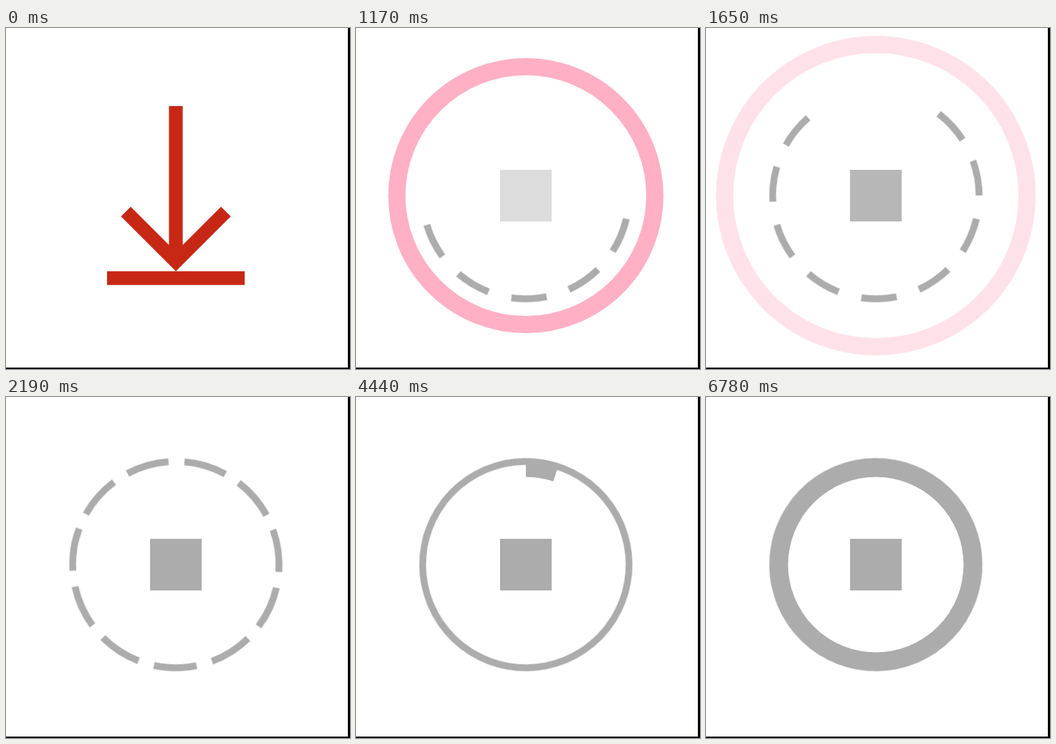
Recreate the animation shown at these times as an HTML page without scripts. Size 480x476 px, loop 8000 ms.

```html
<!DOCTYPE html>
<html lang="en">
<head>
<meta charset="utf-8">
<title>Download progress</title>
<style>
  html, body { margin: 0; width: 100%; height: 100%; overflow: hidden; background: #fff; }
  svg { display: block; width: 100%; height: 100%; }
  svg * { animation: 8s linear infinite; }

  .arrow { fill: none; stroke: #c72815; stroke-width: 19.2; animation-name: arrow; animation-timing-function: step-end; }
  .square { fill: #acacac; animation-name: square; }
  .track, .cover, .ripple, .progress { fill: none; }
  .track { stroke: #acacac; stroke-width: 9.6; animation-name: track, close-gaps; }
  .cover { stroke: #fff; stroke-width: 13; animation-name: uncover; }
  .ripple { stroke: #ff4070; stroke-width: 24; animation-name: ripple; }
  .progress { stroke: #acacac; stroke-width: 24; animation-name: progress; }

  @keyframes arrow {
    0% { opacity: 1; }
    10.5%, 100% { opacity: 0; }
  }
  @keyframes square {
    0% { opacity: 0; animation-timing-function: step-end; }
    10.5% { opacity: .12; }
    22.5%, 100% { opacity: 1; }
  }
  @keyframes track {
    0% { opacity: 0; animation-timing-function: step-end; }
    10.5%, 100% { opacity: 1; }
  }
  /* The path is 11 units long: one per dash. */
  @keyframes close-gaps {
    0%, 25.875% { stroke-dasharray: .6 .4; animation-timing-function: cubic-bezier(.22, .8, .38, 1); }
    41.62% { stroke-dasharray: 1 0; animation-timing-function: step-end; }
    41.625%, 100% { stroke-dasharray: 11 0; }
  }
  /* Dashes appear in pairs, from the bottom up. */
  @keyframes uncover {
    0%, 10.1875% { stroke-dasharray: 10 11; stroke-dashoffset: 0; animation-timing-function: steps(5, end); }
    20.9375%, 100% { stroke-dasharray: 0 11; stroke-dashoffset: -5; }
  }
  @keyframes ripple {
    0% { r: 140.9px; opacity: 0; animation-timing-function: step-end; }
    10.5% { r: 140.9px; opacity: .595; }
    22.499% { r: 214.4px; opacity: .063; animation-timing-function: step-end; }
    22.5%, 100% { r: 214.4px; opacity: 0; }
  }
  /* Radius slows down while the fade stays even. */
  @keyframes grow {
    0%, 10.5% { r: 140.9px; animation-timing-function: cubic-bezier(.333, .609, .667, .943); }
    22.5%, 100% { r: 214.4px; }
  }
  .ripple { animation-name: ripple, grow; }
  @keyframes progress {
    0% { opacity: 0; stroke-dasharray: .05 1; animation-timing-function: step-end; }
    55.5% { opacity: 1; stroke-dasharray: .05 1; animation-timing-function: cubic-bezier(.333, .523, .667, .973); }
    84.75%, 100% { opacity: 1; stroke-dasharray: 1 1; }
  }
</style>
</head>
<body>
<svg viewBox="0 0 480 476" preserveAspectRatio="none">
  <rect width="480" height="476" fill="#fff"/>
  <g transform="translate(237 234)">
    <circle class="track" r="144" pathLength="11" transform="rotate(-85.2)"/>
    <circle class="cover" r="144" pathLength="11" transform="rotate(104.6)"/>
    <circle class="ripple" r="140.9"/>
    <circle class="progress" r="134.4" pathLength="1" transform="rotate(-90)"/>
    <rect class="square" x="-36" y="-36" width="72" height="72"/>
    <path class="arrow" d="M0-125V85M-69.8 22.2L0 92L69.8 22.2M-96 115.1H96"/>
  </g>
  <path d="M477 0h3v476H0v-2h477z"/>
</svg>
</body>
</html>
```
